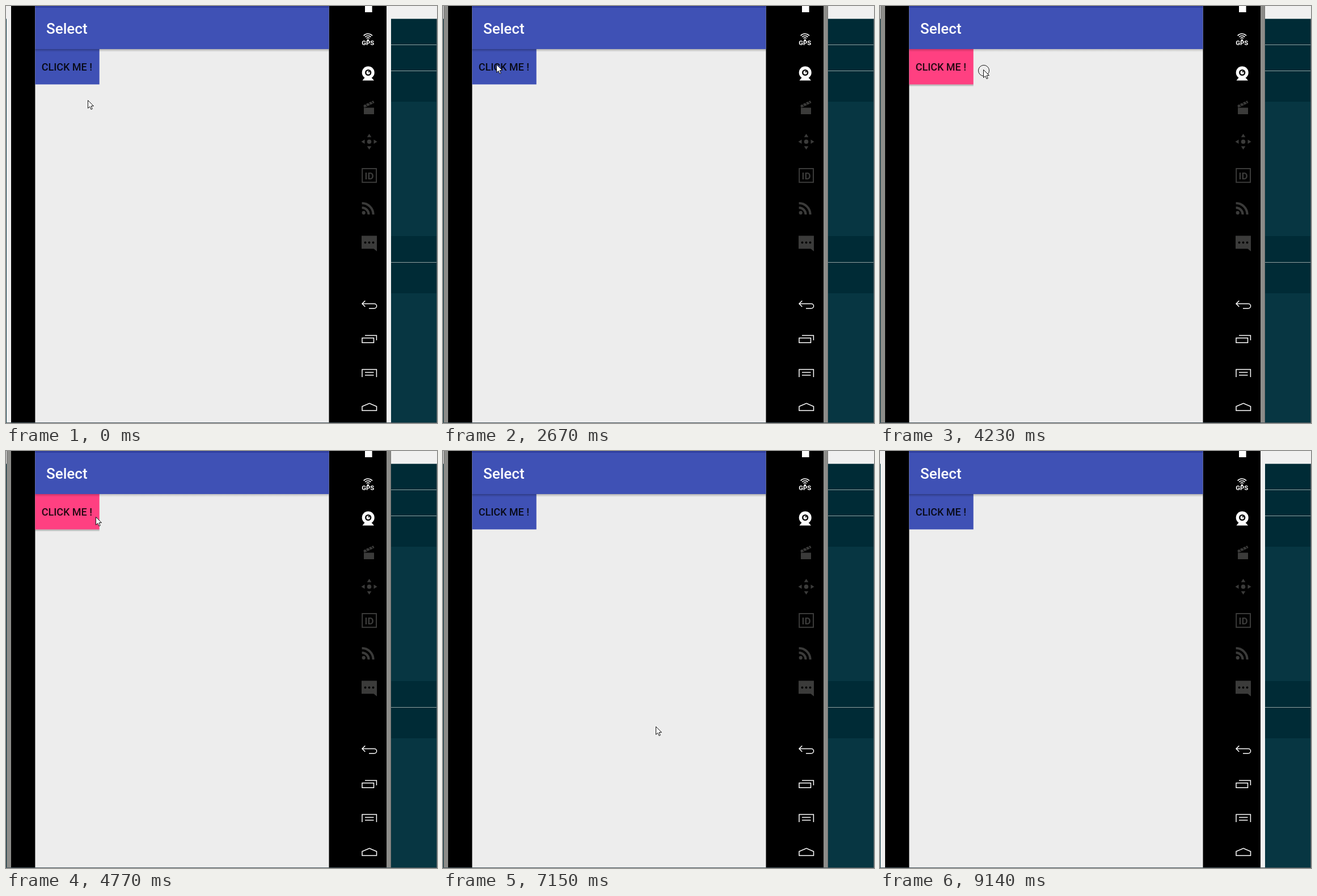
These frames come from a looping animation (760 by 736 pixels, 9.24 s). An HTML page with a canvas:

```html
<!DOCTYPE html>
<html lang="en">
<head>
<meta charset="utf-8">
<title>Select</title>
<style>
html, body { margin: 0; width: 100%; height: 100%; overflow: hidden; background: #000; }
canvas { display: block; }
</style>
</head>
<body>
<canvas id="stage" width="760" height="736"></canvas>
<script>
const ctx = document.getElementById('stage').getContext('2d');
const LOOP = 9240;
const WHITE = '#fff', DIM = '#3b3b3a', BLUE = '#3f51b5', PINK = '#ff4081';
const START = [144, 166];
const SCREEN = { x: 51.4, w: 518.1 };
const BUTTON = { y: 76, w: 113.3, h: 62.4 };

// Pointer moves: first step, last step, step count, end point, optional control point
const MOVES = [
  { from: 120, to: 730, n: 5, end: [178, 232] },
  { from: 1570, to: 2280, n: 6, end: [94, 103] },
  { from: 2790, to: 3460, n: 6, end: [219, 115], via: [200, 209] },
  { from: 4230, to: 4230, n: 1, end: [182, 112] },
  { from: 4380, to: 5190, n: 7, end: [121, 121] },
  { from: 6745, to: 7150, n: 4, end: [375, 486] },
  { from: 7400, to: 7550, n: 2, end: [147, 107] },
  { from: 7670, to: 8030, n: 3, end: [548, 688] }
];
const POINTER_GONE = 8210;
const CLICKS = [[1300, 1570], [2430, 2670], [4230, 4380], [5440, 6610]];
const FOCUS = [1450, 9140];
const SELECTED = [2790, 6745];

const within = (t, [a, b]) => t >= a && t < b;
const ease = u => u * u * (3 - 2 * u);

function pointerAt(t) {
  let pos = START;
  for (const m of MOVES) {
    if (t < m.from) break;
    const gap = m.n > 1 ? (m.to - m.from) / (m.n - 1) : 1;
    const step = Math.min(m.n, Math.floor((t - m.from) / gap + 1e-6) + 1);
    const u = ease(step / m.n), a = pos, b = m.end;
    const c = m.via || [(a[0] + b[0]) / 2, (a[1] + b[1]) / 2];
    pos = [0, 1].map(k =>
      Math.round((1 - u) ** 2 * a[k] + 2 * u * (1 - u) * c[k] + u * u * b[k]));
  }
  return pos;
}

function rect(x, y, w, h, color) {
  ctx.fillStyle = color;
  ctx.fillRect(x, y, w, h);
}

function trace(points, closed) {
  ctx.beginPath();
  points.forEach(([x, y], i) => i ? ctx.lineTo(x, y) : ctx.moveTo(x, y));
  if (closed) ctx.closePath();
}

function shape(points, color) {
  trace(points, true);
  ctx.fillStyle = color;
  ctx.fill();
}

function line(points, color, width, closed) {
  trace(points, closed);
  ctx.strokeStyle = color;
  ctx.lineWidth = width;
  ctx.stroke();
}

function disc(x, y, r, color) {
  ctx.beginPath();
  ctx.arc(x, y, r, 0, 7);
  ctx.fillStyle = color;
  ctx.fill();
}

function arc(x, y, r, a, b, color, width) {
  ctx.beginPath();
  ctx.arc(x, y, r, a, b);
  ctx.strokeStyle = color;
  ctx.lineWidth = width;
  ctx.stroke();
}

function text(str, x, y, font, color, align = 'left') {
  ctx.font = font + ' Roboto, sans-serif';
  ctx.textAlign = align;
  ctx.fillStyle = color;
  ctx.fillText(str, x, y);
}

function fade(x, y, w, h, alpha) {
  const g = ctx.createLinearGradient(0, y, 0, y + h);
  g.addColorStop(0, `rgba(0,0,0,${alpha})`);
  g.addColorStop(1, 'rgba(0,0,0,0)');
  rect(x, y, w, h, g);
}

function drawDesktop() {
  rect(0, 0, 760, 736, '#073642');
  rect(679, 23, 81, 146, '#002b36');
  rect(679, 406, 81, 101, '#002b36');
  rect(0, 0, 760, 22.6, '#f0f0f0');
  for (const y of [68, 114, 452]) rect(679, y, 81, 1, '#93a1a1');
}

function drawToolbar() {
  rect(633, 0, 12.6, 11, WHITE);

  // GPS
  for (const r of [3.5, 7, 10.5]) {
    arc(638.3, 59.5, r, -Math.PI * 0.76, -Math.PI * 0.24, WHITE, 1.7);
  }
  disc(638.3, 60, 1.6, WHITE);
  text('GPS', 638.2, 69, 'bold 11.4px', WHITE, 'center');

  // camera
  disc(638.7, 117.5, 11, WHITE);
  disc(638.7, 117.5, 5.6, '#000');
  disc(638.7, 117.5, 3.2, WHITE);
  disc(640, 116, 1.2, '#000');
  shape([[632, 127], [645, 127], [649, 131.5], [628.5, 131.5]], WHITE);

  // clapper board
  rect(631, 179.5, 18, 11.5, DIM);
  shape([[631, 179], [630.5, 175], [647.5, 167], [649.5, 171], [634, 178.5]], DIM);
  for (const x of [635, 640, 645]) {
    const y = 174.8 - (x - 635) * 0.47;
    line([[x - 1.5, y - 2], [x + 2, y + 1.5]], '#000', 1.2);
  }

  // move pad
  disc(640.5, 239.5, 3.8, DIM);
  for (let i = 0; i < 4; i++) {
    ctx.save();
    ctx.translate(640.5, 239.5);
    ctx.rotate(i * Math.PI / 2);
    shape([[0, -14], [3.8, -8], [-3.8, -8]], DIM);
    ctx.restore();
  }

  // identity
  ctx.strokeStyle = DIM;
  ctx.lineWidth = 2;
  ctx.strokeRect(628.2, 287, 24.8, 24.2);
  text('ID', 640.6, 305.5, 'bold 17px', DIM, 'center');

  // feed
  disc(630.7, 364.9, 3.1, DIM);
  for (const r of [12, 20]) arc(627.6, 368, r, -Math.PI / 2, 0, DIM, 4);

  // message
  shape([[627, 405.5], [654, 405.5], [654, 433], [648.5, 428.5], [627, 428.5]], DIM);
  for (const x of [633.5, 640.5, 647.5]) disc(x, 417.5, 1.9, '#000');

  // back
  ctx.beginPath();
  ctx.moveTo(628, 525.5);
  ctx.lineTo(649.5, 525.5);
  ctx.arc(649.5, 529.6, 4.1, -Math.PI / 2, Math.PI / 2);
  ctx.lineTo(640, 533.7);
  ctx.strokeStyle = WHITE;
  ctx.lineWidth = 1.5;
  ctx.stroke();
  line([[633.3, 520.2], [628, 525.5], [633.3, 530.8]], WHITE, 1.5);

  // overview
  line([[628, 586], [648.5, 586], [648.5, 594.3], [628, 594.3]], WHITE, 1.5, true);
  line([[633, 581.4], [653.4, 581.4], [653.4, 590]], WHITE, 1.5);

  // menu
  line([[628, 655], [628, 641.4], [653.4, 641.4], [653.4, 655]], WHITE, 1.5);
  for (const y of [646.6, 651.6]) line([[633, y], [648.5, y]], WHITE, 1.5);

  // home
  line([[628, 714], [628, 706.7], [640.8, 701.2], [653.5, 706.7], [653.5, 714]], WHITE, 1.5, true);
}

function drawPhone(focused, selected) {
  const { x, w } = SCREEN, b = BUTTON;
  rect(1, 0, 678, 735, focused ? '#8c8c89' : '#f0f0f0');
  if (focused) {
    rect(1, 0, 1, 735, '#747472');
    rect(678, 0, 1, 735, '#747472');
  }
  rect(9, 0, 662, 735, '#000');
  rect(x, 0, w, 735, '#ededed');

  if (selected) fade(x, b.y + b.h, b.w, 4, 0.32);
  rect(x, b.y, b.w, b.h, selected ? PINK : BLUE);
  fade(x, 76, w, 5, selected ? 0.2 : 0.26);
  text('CLICK ME !', 62.7, 114, '500 18px', 'rgba(0,0,0,.87)');

  rect(x, 0, w, 76, BLUE);
  rect(x, 0, w, 3, '#303f9f');
  text('Select', 71, 49.4, '500 26px', WHITE);
  drawToolbar();
}

function drawPointer([x, y], clicked) {
  if (clicked) {
    arc(x + 1, y + 2, 8.6, 0, 7, 'rgba(255,255,255,.8)', 1);
    arc(x + 1, y + 2, 9.5, 0, 7, '#111', 1);
  }
  const arrow = [[0.5, 0.5], [0.5, 14.5], [3.7, 11.5], [6, 16.5], [8.2, 15.6], [6, 10.7], [10.4, 10.5]];
  ctx.save();
  ctx.translate(x, y);
  ctx.lineJoin = 'round';
  shape(arrow, WHITE);
  line(arrow, '#111', 1, true);
  ctx.restore();
}

function draw(t) {
  drawDesktop();
  drawPhone(within(t, FOCUS), within(t, SELECTED));
  rect(0, 735, 760, 1, '#4a5a60');
  rect(759, 23, 1, 713, '#4a5a60');
  if (t < POINTER_GONE) drawPointer(pointerAt(t), CLICKS.some(c => within(t, c)));
}

const began = performance.now();
function tick() {
  draw((performance.now() - began) % LOOP);
  requestAnimationFrame(tick);
}
tick();
</script>
</body>
</html>
```
